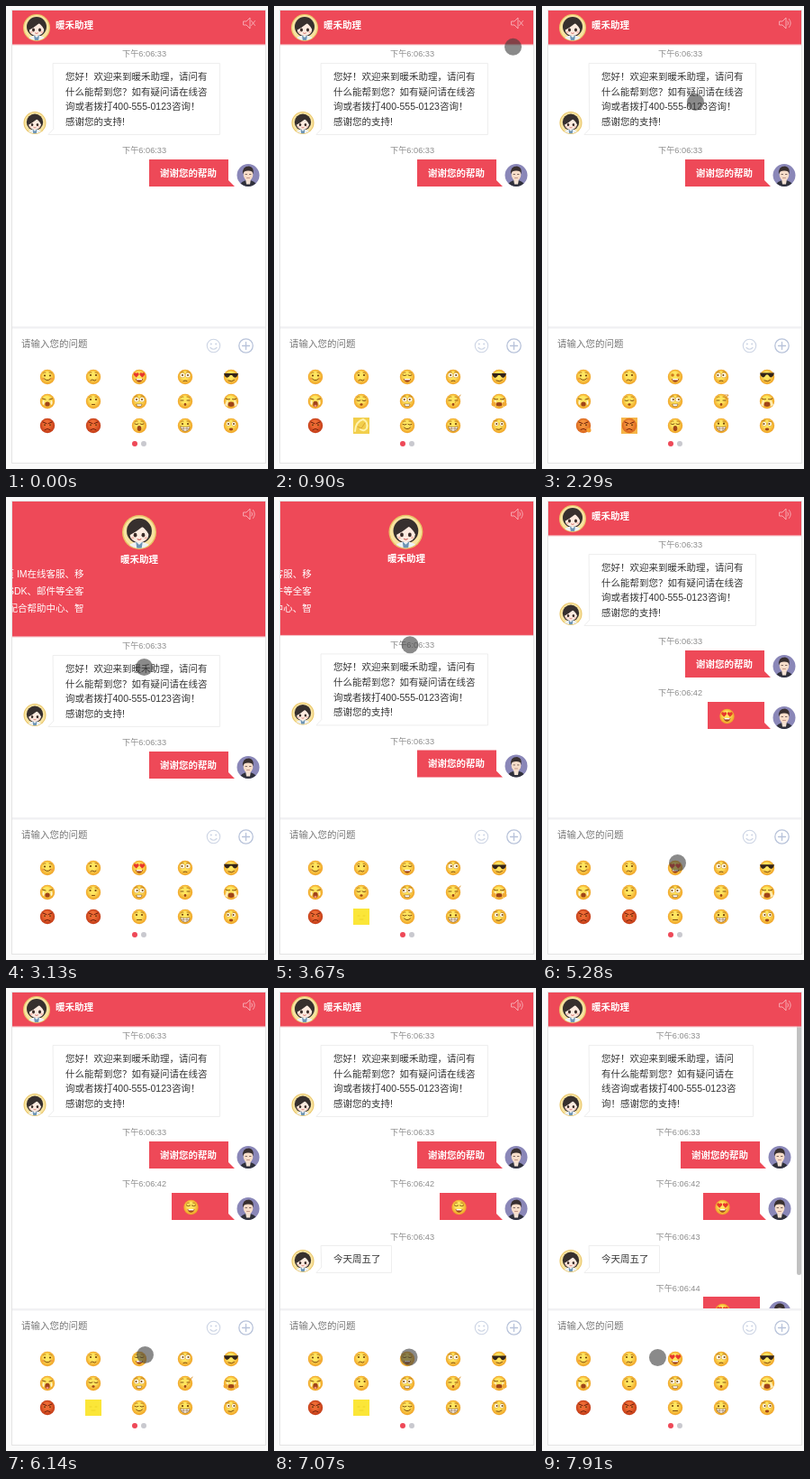
An HTML page with a canvas that plays this animation: 291x513 px, repeating every 7.99 s.

```html
<!DOCTYPE html>
<html lang="zh-CN">
<head>
<meta charset="utf-8">
<title>在线客服</title>
<style>
html, body { margin: 0; width: 100%; height: 100%; overflow: hidden; background: #fafafa; }
canvas { display: block; width: 291px; height: 513px; }
</style>
</head>
<body>
<canvas id="stage"></canvas>
<script>
const W = 291, H = 513, LOOP = 7990, EMOJI_CYCLE = 2600;
const RED = '#ee4958', INK = '#74420c', DARK = '#a04418', BROW = '#b5761a';
const FONT = '"Liberation Sans", "Noto Sans CJK JP", "Noto Sans CJK SC", "Noto Sans CJK", sans-serif';
const NAME = '暖禾助理';
const WIDE = ['您好！欢迎来到暖禾助理，请问有', '什么能帮到您？如有疑问请在线咨', '询或者拨打400-555-0123咨询！', '感谢您的支持!'];
const NARROW = ['您好！欢迎来到暖禾助理，请问', '有什么能帮到您？如有疑问请在', '线咨询或者拨打400-555-0123咨', '询！感谢您的支持!'];
const INTRO = ['一站式智能服务平台，整合网页 IM在线客服、移', '动应用客服、社交渠道、SDK、邮件等全客', '服入口，统一接待与管理，配合帮助中心、智'];

const MUTE_OFF = 1350, FIRST_SENT = 5180, REPLY = 6900, SECOND_SENT = 7250;
const DRAWER = 112; // extra header height when expanded
const POINTER = [ // time, x, y
  [250, 262, 525], [830, 265, 69], [900, 265, 45], [1080, 272, 18], [1560, 272, 18],
  [1750, 246, 19], [2290, 170, 106], [2560, 158, 112], [3130, 153, 188], [3450, 152, 200],
  [3900, 149, 125], [4280, 142, 252], [4440, 141, 252], [4950, 150, 405], [5300, 150, 405],
  [6140, 154, 406], [6850, 150, 408], [7350, 149, 409], [7910, 128, 409], [7990, 124, 409]
];

const canvas = document.getElementById('stage');
const ctx = canvas.getContext('2d');
const ratio = window.devicePixelRatio || 1;
canvas.width = W * ratio;
canvas.height = H * ratio;

const lerp = (a, b, k) => a + (b - a) * k;
const ramp = (t, from, to) => Math.min(1, Math.max(0, (t - from) / (to - from)));
const smooth = k => k * k * (3 - 2 * k);

function text(str, x, y, color, size = 10.5, align = 'left', weight = '') {
  ctx.font = `${weight} ${size}px ${FONT}`;
  ctx.textAlign = align;
  ctx.textBaseline = 'alphabetic';
  ctx.fillStyle = color;
  ctx.fillText(str, x, y + size * 0.37);
}
function rect(x, y, w, h, color) {
  ctx.fillStyle = color;
  ctx.fillRect(x, y, w, h);
}
function oval(x, y, rx, ry, color) {
  ctx.beginPath();
  ctx.ellipse(x, y, rx, ry, 0, 0, 7);
  ctx.fillStyle = color;
  ctx.fill();
}
const disc = (x, y, r, color) => oval(x, y, r, r, color);
const fill = (d, color) => { ctx.fillStyle = color; ctx.fill(new Path2D(d)); };
function line(d, color = INK, width = 0.9) {
  ctx.strokeStyle = color;
  ctx.lineWidth = width;
  ctx.lineCap = 'round';
  ctx.stroke(new Path2D(d));
}
function at(x, y, scale, draw) {
  ctx.save();
  ctx.translate(x, y);
  ctx.scale(scale, scale);
  draw();
  ctx.restore();
}

// Emoji parts, in units of a face with radius 8
function ball(inner = '#ffe660', outer = '#efa024') {
  const g = ctx.createRadialGradient(-1, -3, 1, 0, 0, 8.3);
  g.addColorStop(0, inner);
  g.addColorStop(0.35, inner);
  g.addColorStop(1, outer);
  disc(0, 0, 8.2, g);
}
const eyes = (x = 0, y = -2, r = 1.1) => { disc(x - 3, y, r, INK); disc(x + 3, y, r, INK); };
const shutEyes = (y = -2) => line(`M-5 ${y}q2 1.4 4 0M1 ${y}q2 1.4 4 0`);
const brows = (y = -5) => line(`M-5 ${y + 1}q1-1.5 3-1M5 ${y + 1}q-1-1.5-3-1`, BROW);
const smile = (y = 2) => line(`M-3.5 ${y}Q0 ${y + 3.5} 3.5 ${y}`);
const gape = (y = 3, rx = 2.4, ry = 2.6) => oval(0, y, rx, ry, DARK);
function bigEyes(look, r = 2.6) {
  for (const x of [-3, 3]) {
    disc(x, -2, r + 0.3, '#d0901e');
    disc(x, -2, r, '#fffbe8');
    disc(x + look, -2, 1, INK);
  }
}
const teeth = () => {
  fill('M-5 1Q0 2 5 1Q5 6 0 6T-5 1Z', '#fff');
  line('M-5 1Q0 2 5 1Q5 6 0 6T-5 1ZM-2 1.6V5.5M2 1.6V5.5M-4.5 3.5H4.5', INK, 0.5);
};
const heart = x => fill(`M${x} .8l-2.8-3q-.5-2.6 1.4-2.6 1.1 0 1.4 1 .3-1 1.4-1 1.9 0 1.4 2.6Z`, '#e8372c');

const isMid = p => p > 0.28 && p < 0.8;
const isLate = p => p > 0.8 || p < 0.02;
const wave = p => Math.sin(p * Math.PI * 6);

function love(p) {
  ball();
  if (isMid(p)) { shutEyes(-2); brows(); }
  else if (p >= 0.8) { disc(-3, -2, 1.8, '#d07a1c'); disc(3, -2, 1.8, '#d07a1c'); }
  else { heart(-3.3); heart(3.3); }
  fill('M-4 2H4Q3 5.8 0 5.8T-4 2Z', DARK);
  rect(-3, 2, 6, 1.4, '#fff');
}
function angry(p, burnt) {
  ball(burnt ? '#f4923c' : '#ee6b34', burnt ? '#d9641c' : '#c23a16');
  line('M-5-4L-1-2.4M5-4L1-2.4', '#6a1c0a', 1);
  eyes(0, -0.8, 1);
  line(`M-3 ${4.6 + wave(p) * 0.3}Q0 2 3 4.6`, '#6a1c0a');
}
const FACES = [
  p => { ball(); brows(); eyes(0, -1.5); disc(-5, 2, 1.3, '#f5a03e'); disc(5, 2, 1.3, '#f5a03e'); smile(2 + wave(p) * 0.3); },
  p => { ball(); brows(-5 + wave(p) * 0.5); eyes(); line('M-3 4Q-1.5 2.2 0 3.5T3 3.2'); },
  love,
  p => { ball(); brows(-6); bigEyes(wave(p) * 0.8); line('M-2 4.5Q0 3.4 2 4.5'); },
  p => { ball(); const y = wave(p) * 0.5 - 1;
    fill(`M-8 ${y - 3}H8L7 ${y}Q4 ${y + 4} 1 ${y - 1}H-1Q-4 ${y + 4}-7 ${y}Z`, '#33241a'); line('M-3 4Q1 6 3.5 3.5'); },
  p => { ball(); line('M-5.5-3L-2-2M5.5-3L2-2'); gape(3, 2.7, isMid(p) ? 3.3 : 2.6);
    if (isMid(p)) oval(0, 5, 1.5, 1.2, '#f08a7a'); oval(-4.5, 1.5, 1, 2.4, '#fff6cf'); oval(4.5, 1.5, 1, 2.4, '#fff6cf'); },
  p => { ball(); brows(); if (p > 0.28 && p < 0.6 || p > 0.8) { shutEyes(-1); gape(3.5, 1.6, 1.2); }
    else { eyes(wave(p) * 0.7, -2); line('M-1.5 3.5H1.5'); } },
  p => { ball(); brows(-6); bigEyes(-wave(p)); fill('M-3 3H3L2 5.5H-2Z', '#fff'); line('M-3 3H3L2 5.5H-2Z', INK, 0.5); },
  p => { ball(); brows(); line('M-5-1H-2M2-1H5'); gape(3.5, 1.3, 1.4);
    if (isMid(p)) line('M2 2L8-7', '#d88c20'); if (p > 0.8) line('M4-7H8L5-3H8', '#d88c20'); },
  p => { ball(); line('M-6-3Q-4-1.5-1.5-2.3M6-3Q4-1.5 1.5-2.3'); oval(0, 3.3, 3.6, isMid(p) ? 2.2 : 2.7, DARK);
    fill('M-5-1L-3-1L-4 6L-7 4ZM5-1L3-1L4 6L7 4Z', '#ffedb4');
    if (isMid(p)) { disc(-6, 3, 2.5, '#f2aa34'); disc(6, 3, 2.5, '#f2aa34'); } },
  p => { const late = p > 0.8; angry(p, late); if (late) disc(6, 5, 2.5, '#f5a030'); },
  p => {
    if (isMid(p)) {
      rect(-9, -9, 18, 18, p < 0.35 ? '#f2cf4c' : '#fbe638');
      if (p < 0.35) { line('M-7 6Q-6-5 2-7Q8-4 6 3Q3 7-1 4', '#fff3ae', 2); line('M-4 1L0 3L4-3', '#d9a032'); }
      else line('M-4-1H-2M2-1H4M-2 3H2', '#ecd128');
      return;
    }
    if (p >= 0.8) rect(-9, -9, 18, 18, '#f6b548');
    angry(p, p >= 0.8);
  },
  p => { ball(); brows(); if (isLate(p)) { shutEyes(); gape(3, 2.3, 2.9); }
    else if (isMid(p)) { shutEyes(-1.5); smile(2); } else { eyes(); line('M-2.5 3.5H2.5'); } },
  p => { ball(); brows(); eyes(0, -2 + wave(p) * 0.4); teeth(); },
  p => { ball(); line('M-6-5L-2-6M2-5L5-4', BROW); bigEyes(wave(p) * 0.7, 2.2);
    if (isMid(p)) line('M-3 4Q0 5.5 3 3'); else gape(4, 2.2, 1.4); }
];

function agent(x, y, r) {
  at(x, y, r / 15, () => {
    disc(0, 0, 15, '#e9c566');
    ctx.beginPath(); ctx.arc(0, 0, 14, 0, 7); ctx.clip();
    disc(0, 0, 14, '#f8e3a0');
    oval(0, -1, 11, 11, '#37302e');
    oval(0, 14, 10, 5.5, '#eef2f4');
    fill('M-3 8L0 11L3 8L2 15H-2Z', '#6d95b4');
    oval(0, 2, 8.3, 7, '#fdebe0');
    fill('M-9 3Q-9-8 0-9T9 3Q7-1 3-5Q-3 0-9 3Z', '#37302e');
    oval(-3.5, 2.5, 1.5, 1.9, '#3b2c28'); oval(3.5, 2.5, 1.5, 1.9, '#3b2c28');
    disc(-5.7, 5, 1.2, '#f6bfb2'); disc(5.7, 5, 1.2, '#f6bfb2');
    line('M-1.5 6Q0 7.2 1.5 6', '#c95a55', 0.8);
  });
}
function visitor(x, y) {
  at(x, y, 1, () => {
    ctx.beginPath(); ctx.arc(0, 0, 12.5, 0, 7); ctx.clip();
    disc(0, 0, 13, '#8a87b8');
    oval(0, 12, 9.5, 6.5, '#30313c');
    fill('M-3 4H3L2 10H-2Z', '#f3e1d4');
    oval(0, -0.5, 5.3, 6.5, '#f7ddc9');
    fill('M-6-1Q-7-10 1-10Q7-9 5.5-1L4.5-4Q0-6-4.5-4Z', '#393030');
    line('M-3-1H-1.5M1.5-1H3', '#5a4640', 0.8); line('M-1.5 3H1.5', '#b88474', 0.8);
  });
}
const stamp = (sec, x, y) => text('下午6:06:' + sec, x, y, '#8c8c8c', 9.2, 'center');
function agentBubble(right, top, bottom) {
  line(`M52.5 ${top}H${right}V${bottom}H47L52.5 ${bottom - 6}Z`, '#eeeeee', 1);
  agent(32, bottom - 13, 12.5);
}
function visitorBubble(left, top, right) {
  fill(`M${left} ${top}H${right}V${top + 23}L${right + 7} ${top + 30}H${left}Z`, RED);
  visitor(right + 22, top + 17.5);
}

function chat(t, open, p) {
  const shown = t >= SECOND_SENT, shift = shown ? 5 : 0;
  const right = 247 - shift, mid = 153.5 - shift / 2;
  ctx.save();
  ctx.beginPath(); ctx.rect(7, 42, 281, 313); ctx.clip();
  ctx.translate(0, DRAWER * open);
  stamp(33, mid, 53);
  agentBubble(shown ? 234.5 : 237.5, 63.5, 142.5);
  (shown ? NARROW : WIDE).forEach((s, i) => text(s, 66, 78 + i * 16.7, '#333'));
  stamp(33, mid, 160);
  visitorBubble(right - 88, 170, right);
  text('谢谢您的帮助', right - 76, 185, '#fff', 10.5, 'left', 'bold');
  if (t >= FIRST_SENT) {
    stamp(42, mid, 217);
    visitorBubble(right - 63, 227, right);
    at(right - 41.5, 243, 1, () => love(p));
  }
  if (t >= REPLY) {
    stamp(43, mid, 276);
    agentBubble(130.5, 285.5, 315.5);
    text('今天周五了', 66, 300, '#333');
  }
  if (shown) {
    stamp(44, mid, 333);
    visitorBubble(right - 63, 342, right);
    at(right - 41.5, 358, 1, () => love(p));
    ctx.fillStyle = '#c1c1c1';
    ctx.beginPath(); ctx.roundRect(283, 38, 5, 280, 2.5); ctx.fill();
  }
  ctx.restore();
}

function header(t, open) {
  const bottom = 42.5 + DRAWER * open;
  rect(7, bottom, 281, 1, '#f5c5ca');
  rect(7, 5, 281, bottom - 5, RED);
  agent(lerp(34, 148, open), lerp(24, 39, open), lerp(15, 19, open));
  text(NAME, lerp(55, 127, open), lerp(21, 69, open), '#fff', 10.5, 'left', 'bold');
  const slide = t < 3440 ? ramp(t, 3010, 3410) : 1 - ramp(t, 3480, 3700);
  if (slide > 0) {
    ctx.save();
    ctx.beginPath(); ctx.rect(7, 5, 281, bottom - 5); ctx.clip();
    const edge = 7 + 263 * slide;
    INTRO.forEach((s, i) => text(s, edge, 85 + i * 19, '#fff', 10.5, 'right'));
    text('能机器人，提升服务效率', edge - 236, 142, '#fff');
    ctx.restore();
  }
  at(270, 19, 1, () => {
    const tint = '#f8b4bb';
    line('M-6-2H-3L1-6V6L-3 2H-6Z', tint);
    line(t < MUTE_OFF ? 'M2.5-2.5L6.5 2.5M6.5-2.5L2.5 2.5' : 'M3-2Q4.3 0 3 2M4.5-4.5Q8 0 4.5 4.5', tint);
  });
}

function composer(p) {
  rect(7, 355, 281, 151, '#fff');
  rect(7, 355, 281, 2.5, '#f1f1f3');
  text('请输入您的问题', 17, 374, '#777');
  at(230.5, 376.5, 1, () => {
    line('M-7.2 0a7.2 7.2 0 1 0 14.4 0a7.2 7.2 0 1 0-14.4 0M-3.5 2Q0 5.5 3.5 2', '#ccd4e4', 1.1);
    disc(-2.7, -2, 1, '#ccd4e4'); disc(2.7, -2, 1, '#ccd4e4');
  });
  at(266.5, 376.5, 1, () => line('M-7.7 0a7.7 7.7 0 1 0 15.4 0a7.7 7.7 0 1 0-15.4 0M-4 0H4M0-4V4', '#b8c3da', 1.3));
  FACES.forEach((draw, i) => at(46 + i % 5 * 51, 411 + Math.floor(i / 5) * 27, 1, () => draw(p)));
  disc(143, 485, 3, RED);
  disc(153, 485, 3, '#c9c9cf');
}

function pointer(t) {
  const next = POINTER.findIndex(k => k[0] > t);
  if (next < 1) return;
  const a = POINTER[next - 1], b = POINTER[next], k = ramp(t, a[0], b[0]);
  disc(lerp(a[1], b[1], k) + 0.5, lerp(a[2], b[2], k) + 0.5, 9.5, 'rgba(60,60,60,.6)');
}

function render(t) {
  const open = smooth(ramp(t, 2600, 2950)) - smooth(ramp(t, 3650, 3950));
  const phase = t / EMOJI_CYCLE % 1;
  ctx.setTransform(ratio, 0, 0, ratio, 0, 0);
  rect(0, 0, W, H, '#fafafa');
  rect(6, 4, 283, 503, '#e4e4e4');
  rect(7, 5, 281, 501, '#fff');
  chat(t, open, phase);
  header(t, open);
  composer(phase);
  pointer(t);
}

const start = performance.now();
function tick() {
  render((performance.now() - start) % LOOP);
  requestAnimationFrame(tick);
}
tick();
</script>
</body>
</html>
```
